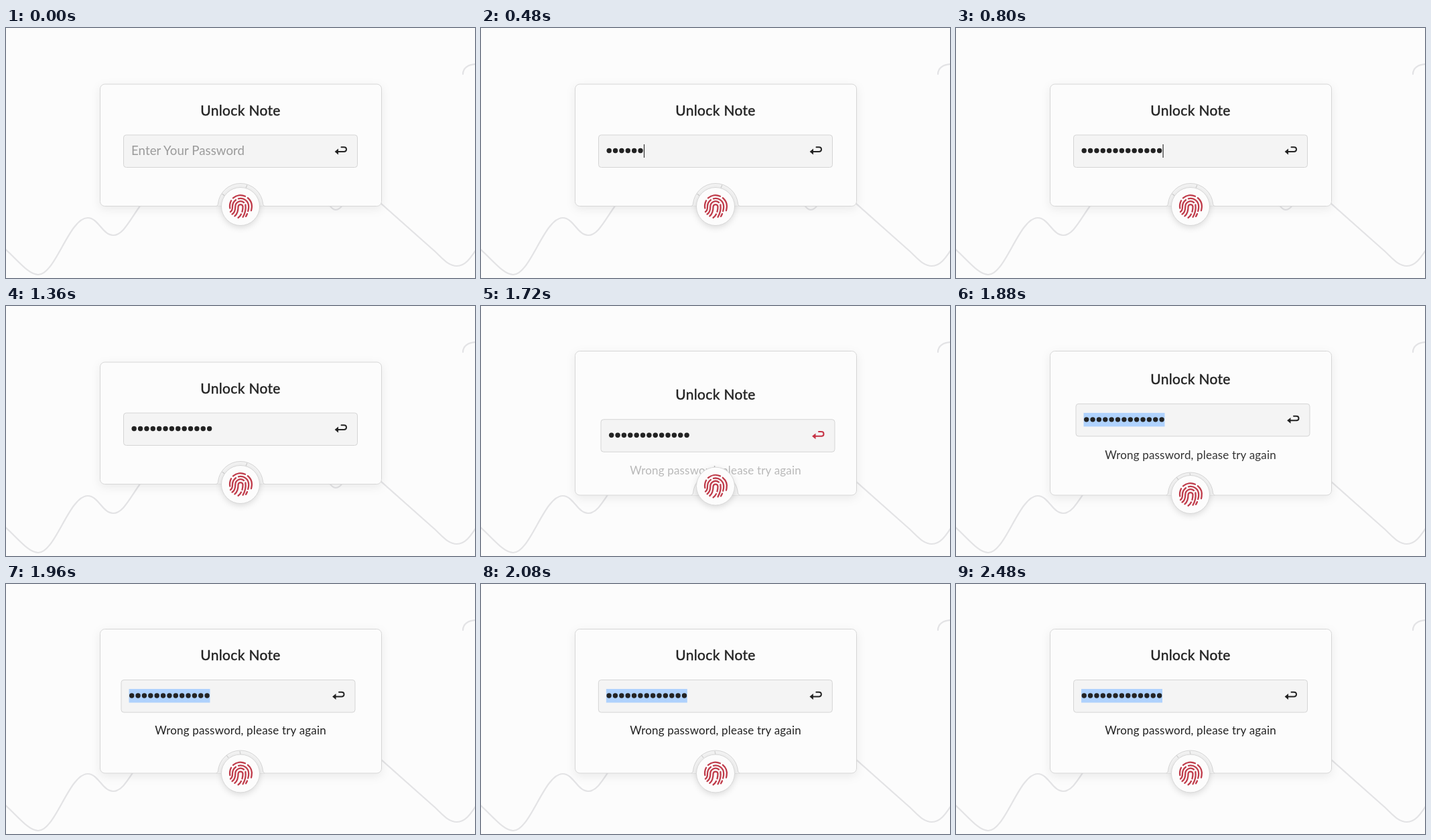
Recreate the animation shown at these times as an HTML page. Size 700 by 374 pixels, loop 3840 ms.

```html
<!DOCTYPE html>
<html lang="en">
<head>
<meta charset="utf-8">
<title>Unlock Note</title>
<style>
  html, body { margin: 0; width: 100%; height: 100%; overflow: hidden; background: #fcfcfc; }
  svg { display: block; font-family: Lato, "Open Sans", sans-serif; fill: none; }
  text { fill: #232323; }
  .title { font-size: 21px; letter-spacing: .35px; text-anchor: middle; stroke: #232323; stroke-width: .45px; }
  .hint { font-size: 18.7px; letter-spacing: .05px; fill: #9b9b9b; }
  .message { font-size: 17px; letter-spacing: .17px; text-anchor: middle; }
  .wave { stroke: #e3e3e5; stroke-width: 2.2; stroke-linecap: round; }
  .card, .badge { fill: #fcfcfc; stroke: #d6d6d6; }
  .card { filter: drop-shadow(0 4px 7px rgba(0, 0, 0, .07)); }
  .badge { filter: drop-shadow(0 3px 4px rgba(0, 0, 0, .12)); }
  .field { fill: #f4f4f4; stroke: #d5d5d5; }
  .ring { fill: #f3f3f3; stroke: #d6d6d6; }
  .print { stroke: #c03c4b; stroke-width: 2.3; stroke-linecap: round; }
</style>
</head>
<body>
<svg width="700" height="374" viewBox="0 0 700 374">
  <g class="wave">
    <path d="M-2 330C20 350 34 369 48 369C74 369 94 284 122 284C138 284 144 310 160 310C176 310 186 284 206 258"/>
    <path d="M482 264C486 270 489 272 492 272C496 272 499 270 503 264"/>
    <path d="M540 245L640 334C652 345 660 356 673 356C685 356 693 345 702 331"/>
    <path d="M682 69C682 60 690 54 702 54"/>
  </g>

  <rect id="card" class="card" x="140.5" width="420" rx="7"/>

  <g id="content">
    <text class="title" x="350" y="130.5">Unlock Note</text>
    <g id="input">
      <rect class="field" x="175.5" y="160" width="349" height="48.5" rx="4"/>
      <text id="hint" class="hint" x="187" y="190">Enter Your Password</text>
      <rect id="selection" x="187" y="173.5" width="121" height="20.5" fill="#afd2fd"/>
      <g id="dots" fill="#232323"></g>
      <path id="caret" d="M0 174V194" stroke="#333" stroke-width="1.2"/>
      <g id="enter">
        <path d="M500.5 178.3H504.3Q508 178.3 508 181.6Q508 185 504.3 185H494" stroke-width="2" stroke-linecap="round"/>
        <path d="M490.6 185L496 180.6V189.4Z" stroke="none"/>
      </g>
    </g>
  </g>

  <text id="message" class="message" x="350" y="225">Wrong password, please try again</text>

  <g id="ring">
    <path class="ring" d="M314 0Q316.4 -1 316.5 -3A33.6 33.6 0 0 1 383.5 -3Q383.6 -1 386 0"/>
    <path id="ticks" stroke="#d0d0d0" stroke-width="1.2"/>
  </g>
  <g id="badge">
    <circle class="badge" r="28.5"/>
    <g class="print">
      <path d="M-11 -12.6A16.6 16.6 0 0 1 7 -15.2"/>
      <path d="M10.8 -12.8A16.6 16.6 0 0 1 16.6 3L16 6"/>
      <path d="M-15.7 2.5C-16.6 -2.5 -15.4 -6 -13.9 -8.8"/>
      <path d="M-15 8C-11.6 5.4 -12 2.5 -12 0A12.2 12.2 0 0 1 -7 -9.7"/>
      <path d="M-3 -11.7A12.2 12.2 0 0 1 12.2 0C12.3 3 11.8 5 11.2 7"/>
      <path d="M-12.4 11.6C-8.2 9 -7.7 4 -7.7 0A7.8 7.8 0 0 1 5 -6"/>
      <path d="M7.4 -2.5C8.3 3 7.2 9.5 3.6 15.8"/>
      <path d="M-8.6 14.4C-3.8 10.5 -3.4 5 -3.4 0A3.5 3.5 0 0 1 3.5 0C3.6 3 3.2 5.4 2.5 7.8"/>
      <path d="M1 11.5C0 13.7 -1.5 15.4 -3.4 16.8"/>
      <path d="M10 11C9.4 12.5 8.8 13.6 8 14.8"/>
    </g>
  </g>
</svg>
<script>
const LOOP = 3840, TYPE = 240, BLUR = 1360, ERROR = 1720, SELECT = 1760;
const STEP = 9.37, GROW = 16.5;
const $ = id => document.getElementById(id);
const show = (id, on) => $(id).setAttribute("visibility", on ? "visible" : "hidden");
const move = (id, x, y) => $(id).setAttribute("transform", `translate(${x} ${y})`);
const clamp = v => Math.min(1, Math.max(0, v));

$("dots").innerHTML = Array.from({ length: 13 }, (_, i) =>
  `<circle cx="${191.2 + i * STEP}" cy="183.5" r="3.7"/>`).join("");
const dots = [...$("dots").children];

function typed(t) {
  if (t >= 800) return 13;
  if (t >= 680) return 10;
  return Math.min(9, Math.max(0, Math.floor((t - TYPE) / 40)));
}

function draw(t) {
  const failed = t >= ERROR, age = t - ERROR;
  const grow = failed ? GROW : 0;
  const left = failed ? (1 - clamp(age / 240)) ** 2 : 0;
  const shake = failed && age < 520 ? 3.5 * Math.cos(age / 160 * 2 * Math.PI) : 0;

  $("card").setAttribute("y", 84 - grow);
  $("card").setAttribute("height", 182.5 + 2 * grow);
  move("content", 0, 26.5 * left - grow);
  move("input", shake, 0);

  const count = typed(t);
  dots.forEach((dot, i) => dot.setAttribute("visibility", i < count ? "visible" : "hidden"));
  show("hint", t < TYPE);
  show("caret", t >= TYPE && t < BLUR);
  move("caret", 187.3 + count * STEP, 0);
  show("selection", t >= SELECT);

  const red = failed ? 1 - clamp(age / 90) : 0;
  const ink = `rgb(${35 + 165 * red},${35 + 15 * red},${35 + 33 * red})`;
  $("enter").setAttribute("stroke", ink);
  $("enter").setAttribute("fill", ink);
  $("enter").firstElementChild.setAttribute("fill", "none");

  show("message", failed);
  move("message", 0, 13.5 * (1 + Math.cos(Math.PI * clamp(age / 212))));
  $("message").setAttribute("opacity", 1 - .7 * left);

  move("ring", 0, 266.5 + grow);
  $("ticks").setAttribute("d", failed
    ? "M329 -27L332 -23M349 -33L350 -28"
    : "M322.5 -18.5L327 -15M360 -32L358 -27");
  move("badge", 350, 267 + grow - 14 * left);
}

function frame(now) {
  draw(now % LOOP);
  requestAnimationFrame(frame);
}
draw(0);
requestAnimationFrame(frame);
</script>
</body>
</html>
```
